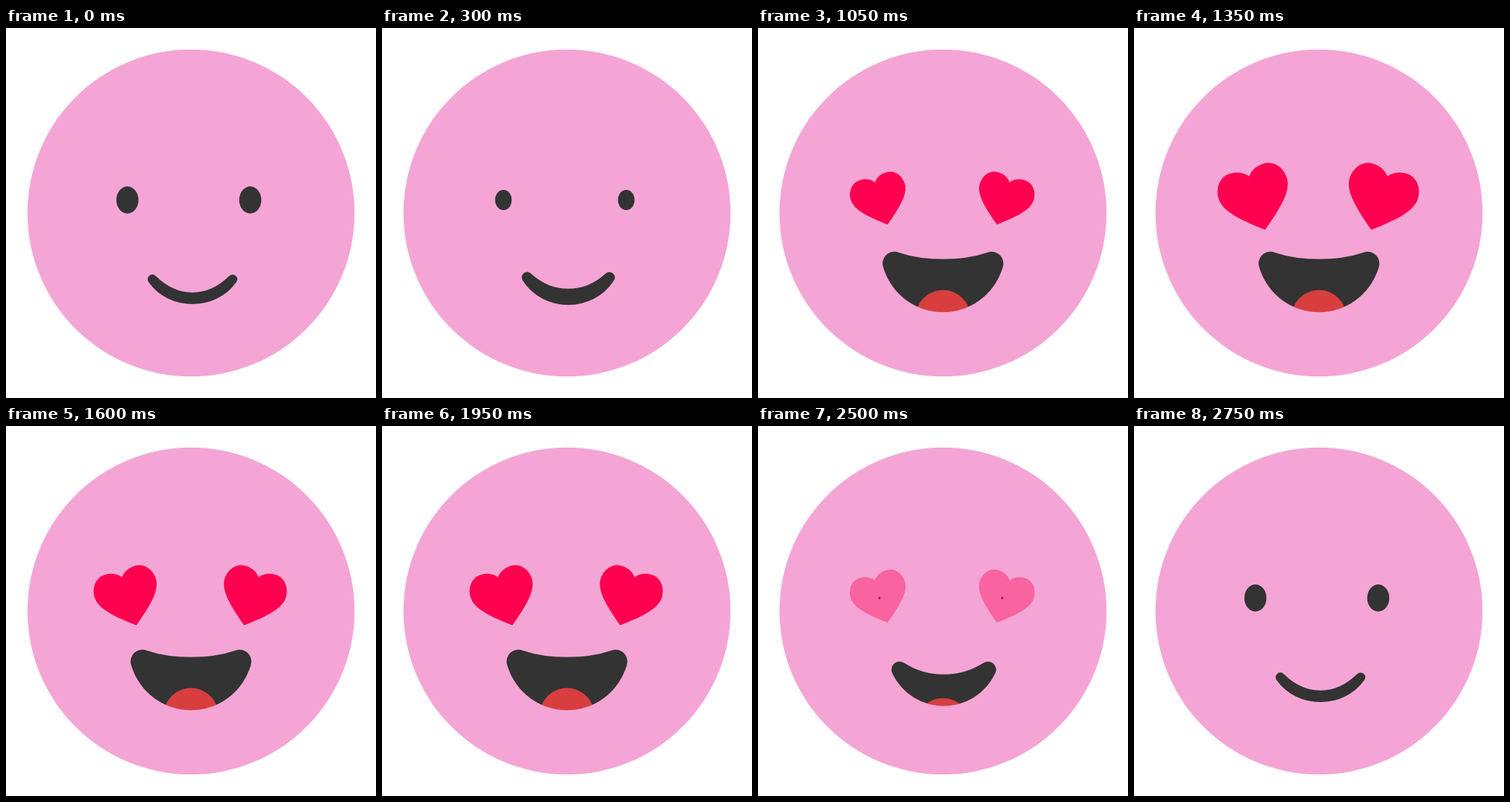
Write an HTML page with a canvas that moves like this. It is 512 px wide and 512 px high and loops after 2.8 s.

```html
<!DOCTYPE html>
<html lang="en">
<head>
<meta charset="utf-8">
<title>Heart eyes</title>
<style>
  html, body { margin: 0; width: 100%; height: 100%; overflow: hidden; background: #fff; }
  canvas { display: block; width: 100vmin; height: 100vmin; }
</style>
</head>
<body>
<canvas id="stage" width="512" height="512"></canvas>
<script>
const ctx = document.getElementById('stage').getContext('2d');
const LOOP = 2800, STEP = 50;
const DARK = '#333333', FACE = '#f4a5d5', HEART = '#ff0050', TONGUE = '#d83e3e';

// A mouth is a crescent thickened by a round outline of the given radius.
const SMILE = { axis: 258, halfWidth: 55.5, cornerY: 347.7, top: 372.5, bottom: 375.5, radius: 6.5, sag: 0.53 };
const LAUGH = { axis: 256, halfWidth: 67.2, cornerY: 326, top: 336.2, bottom: 376.8, radius: 16.4, sag: 0.68 };

const lerp = (a, b, u) => a + (b - a) * u;
const ramp = (t, from, to) => Math.min(1, Math.max(0, (t - from) / (to - from)));
const ease = u => (1 - Math.cos(Math.PI * u)) / 2;
const pulse = (t, inFrom, inTo, outFrom, outTo) => ramp(t, inFrom, inTo) - ramp(t, outFrom, outTo);

function fillEllipse(x, y, rx, ry, color) {
  ctx.beginPath();
  ctx.ellipse(x, y, rx, ry, 0, 0, Math.PI * 2);
  ctx.fillStyle = color;
  ctx.fill();
}

function drawMouth(open) {
  const m = {};
  for (const key in SMILE) m[key] = lerp(SMILE[key], LAUGH[key], open);

  // Curve between the corners that passes through midY on the axis.
  const curve = (midY, spread, side) => {
    const handleY = (4 * midY - m.cornerY) / 3;
    const dx = side * m.halfWidth;
    ctx.bezierCurveTo(m.axis - dx * spread, handleY, m.axis + dx * spread, handleY, m.axis + dx, m.cornerY);
  };
  ctx.beginPath();
  ctx.moveTo(m.axis - m.halfWidth, m.cornerY);
  curve(m.top, 0.4, 1);
  curve(m.bottom, m.sag, -1);
  ctx.closePath();
  ctx.fillStyle = ctx.strokeStyle = DARK;
  ctx.lineWidth = 2 * m.radius;
  ctx.lineJoin = 'round';
  ctx.fill();
  ctx.stroke();

  ctx.globalCompositeOperation = 'source-atop';
  fillEllipse(256, 400.5 + 30 * Math.max(0, 0.95 - open), 38, 38, TONGUE);
}

function drawFace() {
  ctx.globalCompositeOperation = 'destination-over';
  fillEllipse(256, 256, 226.3, 226.3, FACE);
  ctx.globalCompositeOperation = 'source-over';
}

function drawHeart(side, scale, alpha) {
  ctx.save();
  ctx.translate(255 + side * 83.8, 244.8);
  ctx.scale(side * scale, scale);
  ctx.rotate(0.291);
  ctx.beginPath();
  ctx.moveTo(0, -40);
  ctx.bezierCurveTo(5, -47, 13, -51, 24, -51);
  ctx.bezierCurveTo(38, -51, 48, -38, 48, -23);
  ctx.bezierCurveTo(48, -4, 25, 15, 0, 35);
  ctx.bezierCurveTo(-25, 15, -48, -4, -48, -23);
  ctx.bezierCurveTo(-48, -38, -38, -51, -24, -51);
  ctx.bezierCurveTo(-13, -51, -5, -47, 0, -40);
  ctx.globalAlpha = alpha;
  ctx.fillStyle = HEART;
  ctx.fill();
  ctx.restore();
}

// Slow growth to full size, then a steady beat between 80% and 100%.
function heartScale(t) {
  const full = 1.065, dip = 0.265;
  if (t < 1400) return lerp(0.345, full, ramp(t, 400, 1400));
  const phase = ((t - 1400) / 375) % 2;
  return full - dip * (1 - Math.abs(1 - phase));
}

function draw(t) {
  ctx.clearRect(0, 0, 512, 512);
  drawMouth(ease(pulse(t, 200, 660, 2290, 2700)));
  drawFace();

  const eyes = 1 - ease(pulse(t, 200, 500, 2450, 2700));
  const hearts = pulse(t, 400, 667, 2350, 2600);
  for (const side of [-1, 1]) {
    if (eyes > 0) fillEllipse(253 + side * 85, 238, 15.3 * eyes, 18.7 * eyes, DARK);
    if (hearts > 0) drawHeart(side, heartScale(t), hearts);
  }
}

function tick() {
  const t = performance.now() % LOOP;
  draw(Math.floor(t / STEP) * STEP);
  requestAnimationFrame(tick);
}
tick();
</script>
</body>
</html>
```
